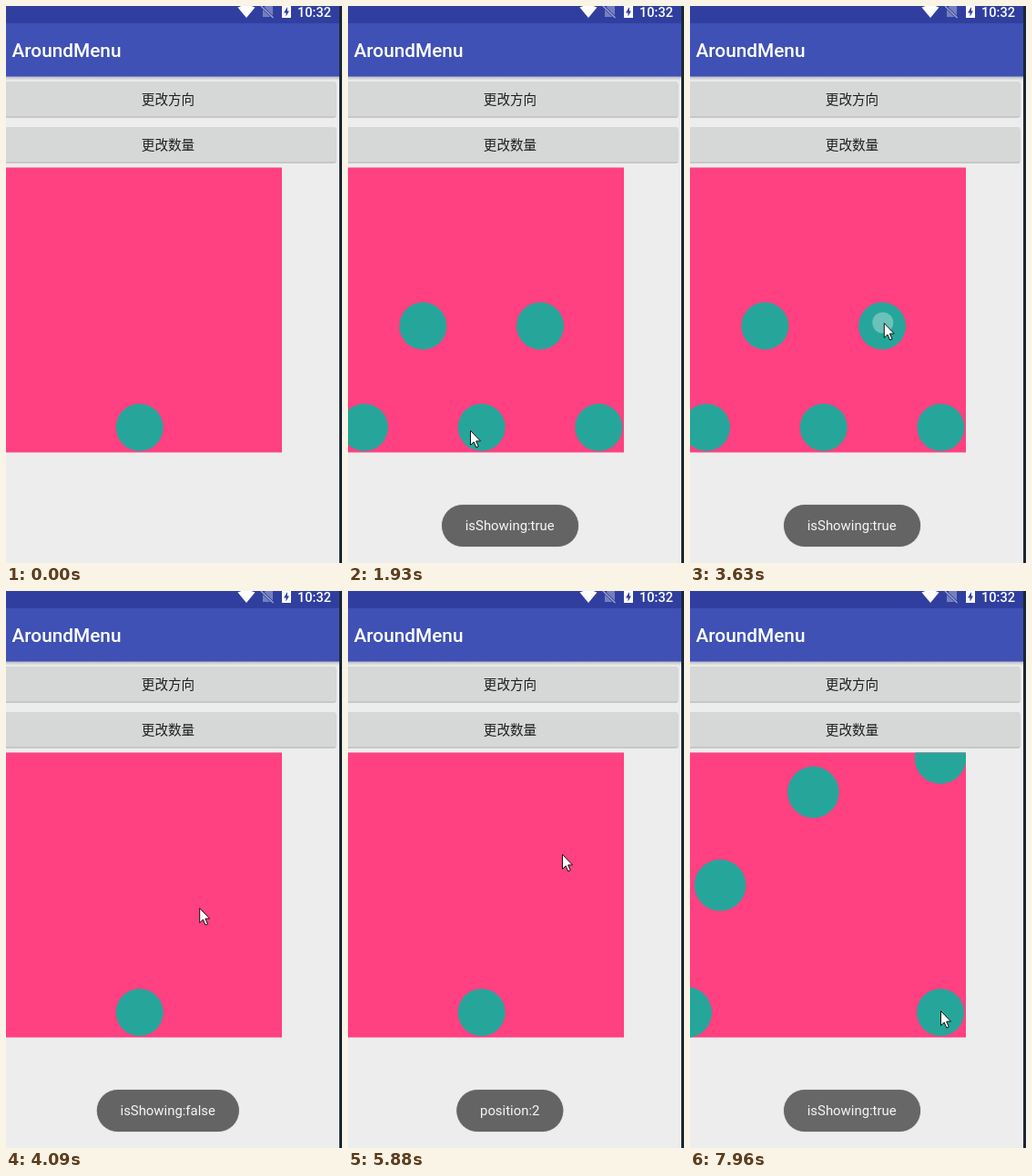
These frames come from a looping animation (369x612 px, 8 s). An HTML page:

```html
<!DOCTYPE html>
<html lang="zh">
<head>
<meta charset="utf-8">
<title>AroundMenu</title>
<style>
  html, body { margin: 0; width: 100%; height: 100%; overflow: hidden; background: #ededed; }
  #stage { position: absolute; left: 0; top: 0; width: 369px; height: 612px; overflow: hidden; }
  svg { position: absolute; left: 0; top: 0; }
  text { font-family: Roboto, sans-serif; font-weight: 500; fill: #fff; }
  .label { font: 400 14.6px "Noto Sans CJK SC", "Noto Sans CJK", sans-serif; fill: #1e1e1e; text-anchor: middle; }
  .toast {
    position: absolute; left: 177.7px; top: 548px; height: 46px; padding: 0 26px;
    transform: translateX(-50%); border-radius: 23px; background: #646464; color: #f6f6f6;
    font: 14.9px/47px Roboto, sans-serif; white-space: nowrap; opacity: 0;
    box-shadow: 0 0 1px #888;
  }
</style>
</head>
<body>
<div id="stage">
  <svg width="369" height="612">
    <defs>
      <linearGradient id="shade" x2="0" y2="1">
        <stop stop-color="#b5b6bd"/><stop offset="1" stop-color="#ededed"/>
      </linearGradient>
      <clipPath id="panelClip"><rect y="177.5" width="303" height="313"/></clipPath>
      <clipPath id="buttonClip"><rect x="-4" y="83" width="366.5" height="38.5" rx="2"/></clipPath>
    </defs>
    <rect width="369" height="612" fill="#ededed"/>
    <rect y="77" width="366" height="5" fill="url(#shade)"/>
    <rect y="19" width="366" height="58.5" fill="#3f51b5"/>
    <rect width="366" height="19" fill="#303f9f"/>
    <text x="6.5" y="56" font-size="20.8">AroundMenu</text>

    <path d="M254.500 1.500Q264-3 273.500 1.500L264 13Z" fill="#fff"/>
    <path d="M282 3L286-1H293V12H282Z" fill="#7480bd"/>
    <path d="M280 0L293.500 13" stroke="#303f9f" stroke-width="3"/>
    <path d="M280 0L293.500 13" stroke="#a5add6" stroke-width="1.200"/>
    <path d="M303 0H313V13H303Z" fill="#fff"/>
    <path d="M309 1L305 7.500H307.500V11.500L311 5.500H309Z" fill="#303f9f"/>
    <text x="320" y="12" font-size="14.6">10:32</text>

    <g id="buttons"></g>
    <circle id="ripple" cx="184" cy="103" fill="#000" fill-opacity=".12" clip-path="url(#buttonClip)"/>

    <rect y="177.5" width="303" height="313" fill="#ff4081"/>
    <g clip-path="url(#panelClip)" fill="#26a69a">
      <g id="items"></g>
      <circle id="hub" cy="463" r="26"/>
    </g>
    <rect x="366" width="3" height="612" fill="#1b2634"/>
  </svg>
  <svg width="369" height="612" style="z-index:1">
    <circle id="touch" r="11.5" fill="#fff" fill-opacity=".32"/>
    <path id="cursor" d="M.5.500V16.500L4.200 13 6.800 19 9.300 18 6.700 12H11.500Z"
          fill="#fff" stroke="#111" stroke-linejoin="round"/>
  </svg>
</div>
<script>
const LOOP = 8000, GROW = 200, FADE = 150;
const $ = id => document.getElementById(id);
const clamp = v => Math.min(1, Math.max(0, v));
const set = (el, attrs) => { for (const k in attrs) el.setAttribute(k, attrs[k]); };

function add(parent, tag, attrs, text = '') {
  const el = document.createElementNS(parent.namespaceURI, tag);
  set(el, attrs);
  el.textContent = text;
  parent.append(el);
  return el;
}

// The screen refreshes in bursts: [first, last, count]
const bursts = [
  [0, 0, 1], [810, 1540, 6], [1690, 1810, 2], [1930, 1930, 1], [2230, 3080, 7],
  [3480, 4090, 5], [4650, 5610, 8], [5740, 5880, 2], [6000, 6700, 6],
  [6850, 6850, 1], [7000, 7810, 7], [7960, 7960, 1]
];
const ticks = bursts.flatMap(([a, b, n]) =>
  Array.from({ length: n }, (_, i) => a + (n > 1 ? (b - a) * i / (n - 1) : 0)));

// Pointer: time, x, y
const path = [
  [810, 307, 310], [1400, 134, 466], [2100, 134, 466], [3000, 213, 348],
  [4530, 212, 348], [5500, 246, 371], [5610, 246, 371], [5740, 243, 338],
  [5880, 235, 289], [6420, 200, 107], [6950, 200, 107], [7650, 275, 461], [8000, 275, 461]
];
const presses = [[1500, 1650], [3470, 3600], [6550, 6690], [7670, 7800]];

const toasts = [
  ['isShowing:true', 1650, 3680], ['isShowing:false', 3830, 5690],
  ['position:2', 5720, 7690], ['isShowing:true', 7814, 9000]
].map(([text, from, until]) => {
  const el = document.createElement('div');
  el.className = 'toast';
  el.textContent = text;
  $('stage').append(el);
  return { el, from, until };
});

[['更改方向', 83], ['更改数量', 133]].forEach(([label, y]) => {
  const box = { x: -4, width: 366.5, height: 38.5, rx: 2 };
  add($('buttons'), 'rect', { ...box, y: y + 1.2, fill: '#b9baba' });
  add($('buttons'), 'rect', { ...box, y, fill: '#d6d7d7' });
  add($('buttons'), 'text', { class: 'label', x: 178, y: y + 25 }, label);
});
const items = [0, 1, 2, 3].map(() => add($('items'), 'circle', {}));

function overshoot(t) {
  const u = clamp(t) - 1;
  return u * u * (3 * u + 2) + 1;
}

function spread(t) {
  if (t >= 7814) return overshoot((t - 7814) / GROW);
  if (t < 1650) return 0;
  if (t < 3590) return overshoot((t - 1650) / GROW);
  return 1 - clamp((t - 3590) / GROW);
}

function pointer(t) {
  const i = path.findIndex(p => p[0] > t);
  const [t0, x0, y0] = path[i - 1], [t1, x1, y1] = path[i];
  const s = (t - t0) / (t1 - t0);
  const e = t1 - t0 > 560 ? s * s * (3 - 2 * s) : s;
  return [x0 + (x1 - x0) * e, y0 + (y1 - y0) * e];
}

function draw(time) {
  const t = ticks.filter(v => v <= time).pop();

  const corner = t >= 6700, hubX = corner ? 275 : 146.7;
  const reach = corner ? 257 : 128.7, step = corner ? 30 : 60;
  const k = spread(t);
  set($('hub'), { cx: hubX });
  items.forEach((item, i) => {
    const a = (180 - i * step) * Math.PI / 180;
    set(item, {
      cx: hubX + Math.cos(a) * reach * k,
      cy: 463 - Math.sin(a) * reach * k,
      r: 26 * k
    });
  });

  const rippling = t >= 6560 && t < 6850;
  set($('ripple'), { r: rippling ? 128 * clamp((t - 6500) / 200) : 0 });

  const visible = t >= 810;
  const [x, y] = visible ? pointer(t) : [0, 0];
  const pressed = presses.some(([a, b]) => t >= a && t < b);
  set($('cursor'), { transform: `translate(${x} ${y})`, visibility: visible ? 'visible' : 'hidden' });
  set($('touch'), { cx: x - 1, cy: y, visibility: pressed ? 'visible' : 'hidden' });

  for (const { el, from, until } of toasts)
    el.style.opacity = Math.min(clamp((t - from) / FADE), clamp((until + FADE - t) / FADE));
}

const start = performance.now();
function frame() {
  draw((performance.now() - start) % LOOP);
  requestAnimationFrame(frame);
}
frame();
</script>
</body>
</html>
```
